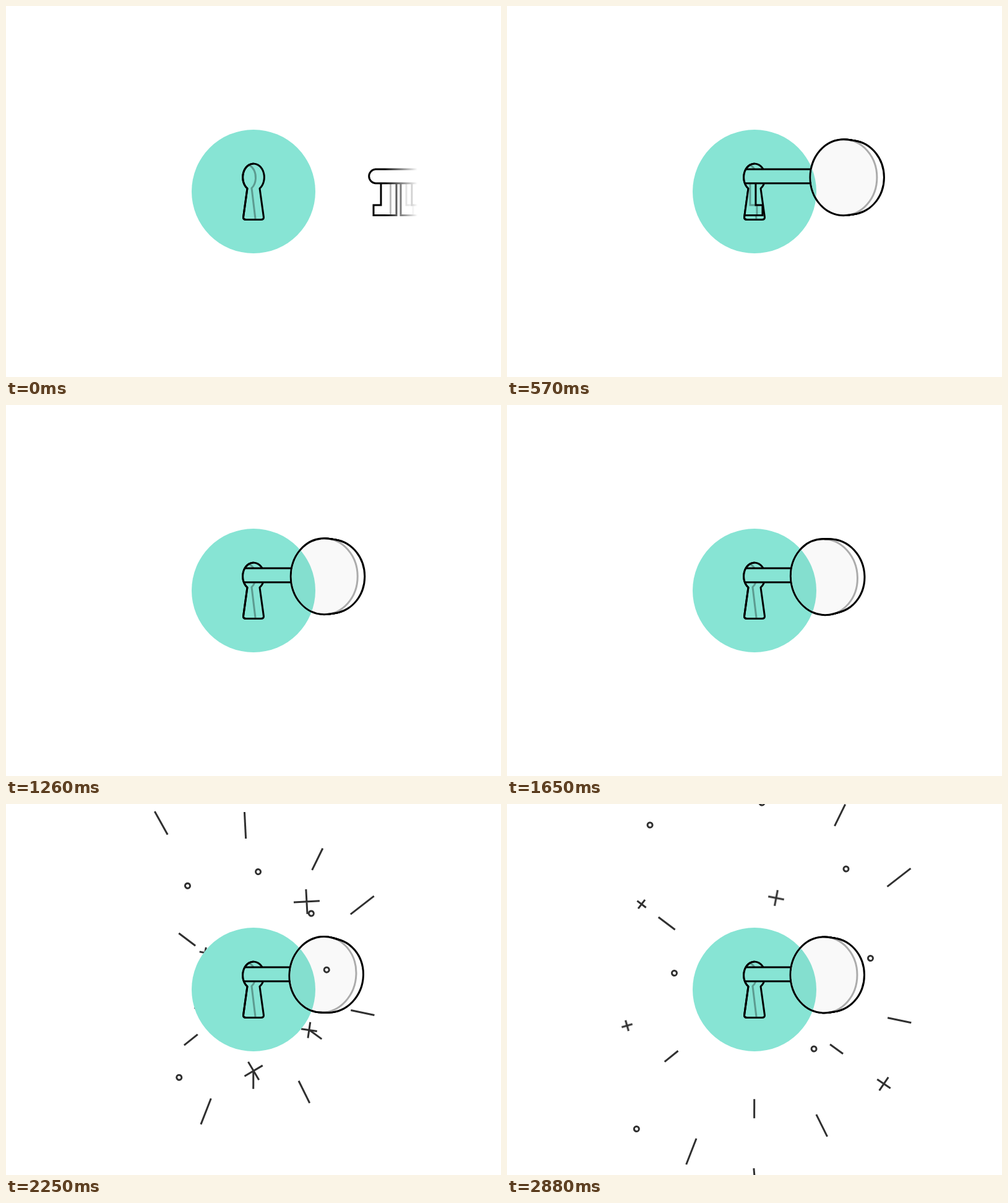
Write an HTML page without scripts that moves like this. It is 800 px wide and 600 px high and loops after 2.91 s.

```html
<!DOCTYPE html>
<html lang="en">
<head>
<meta charset="utf-8">
<title>Key and keyhole</title>
<style>
@property --t { syntax: "<number>"; inherits: true; initial-value: 0; }

html, body { margin: 0; width: 100%; height: 100%; overflow: hidden; background: #fff; }

/* --t is the clock in ms; every pose below is a formula of it */
svg {
  display: block; width: 800px; height: 600px;
  animation: clock 2910ms steps(97) -2ms infinite;

  /* slide of the key */
  --slide: calc(286 * exp(var(--t) / -260));

  /* half turn of the key: speeds up to edge-on, then slows down */
  --p: clamp(0, (var(--t) - 1578) / 751, 1);
  --m: min(var(--p), 1 - var(--p));
  --half: clamp(-1, (var(--p) - .5) * 9999, 1);
  --a: calc(6.28319 * var(--m) * var(--m) * var(--half));
  --sin: sin(var(--a));
  --cos: max(.05, cos(var(--a)));
  --lift: max(var(--sin), -1 * var(--sin));
  --cy: calc(276.8 - .4 * var(--half));
}
@keyframes clock { from { --t: 0; } to { --t: 2910; } }

.teal { fill: #87e4d4; }
.white { fill: #fff; }
.line { fill: none; stroke: #000; stroke-width: 3; stroke-linejoin: round; }
.soft { fill: none; stroke: #000; stroke-width: 3; stroke-opacity: .32; }

.key { transform: translateX(calc(var(--slide) * 1px)); }

/* slice of the coin, --f runs from near (0) to far (1) */
.disc {
  rx: 52.5px; ry: 60px;
  vector-effect: non-scaling-stroke;
  transform: matrix(1, 0,
    calc(-.488 * var(--sin)),
    calc(var(--cos) * (1 - .03 * var(--f))),
    calc(var(--slide) + 517.75 - 1.6 * var(--lift) + 11.5 * var(--cos) * (var(--f) - .5)),
    calc(var(--cy) + 4.4 * var(--lift) + 27 * var(--sin) * (var(--f) - .5)));
}
.rim { fill: #000; stroke: #000; stroke-width: 6; }
.face { rx: 54px; ry: 61.5px; fill: #000; fill-opacity: .022; }

/* burst */
.burst { fill: none; stroke: #303030; stroke-width: 3; }
.rays { --g: max(0, 1 - exp((1926 - var(--t)) / 260)); }
.dots { --g: max(0, 1 - exp((2006 - var(--t)) / 260)); }
.plus { --g: max(0, 1 - exp((2114 - var(--t)) / 260)); }
.rays path { transform: rotate(calc(var(--d) * 1deg)) translateX(calc(var(--r) * var(--g) * 1px)); }
.dots circle { r: 4px; }
.dots circle, .plus path {
  transform:
    translate(calc(var(--x) * var(--g) * 1px), calc(var(--y) * var(--g) * 1px))
    rotate(calc((var(--d, 0) - 48 * (1 - var(--g))) * 1deg));
}
</style>
</head>
<body>
<svg viewBox="0 0 800 600" xmlns="http://www.w3.org/2000/svg">
  <defs>
    <path id="hole" d="M400 255A17.3 22 0 0 0 390 295L383.6 341Q383 345.5 388 345.5H412Q417 345.5 416.4 341L410 295A17.3 22 0 0 0 400 255Z"/>
    <g id="ground">
      <rect class="white" width="800" height="600"/>
      <circle class="teal" cx="400" cy="300" r="100"/>
    </g>
    <clipPath id="reach">
      <use href="#hole"/>
      <rect x="400" width="400" height="600"/>
    </clipPath>
    <clipPath id="solid">
      <path class="key" d="M490 264H311A11.4 11.4 0 0 0 311 286.7H490Z"/>
      <path class="key" d="M320 286V322H308V338.5H345V286Z"/>
      <path class="key" d="M352 286V338.5H381V322H370V286Z"/>
    </clipPath>
    <clipPath id="coin">
      <ellipse class="disc" style="--f:0"/>
      <ellipse class="disc" style="--f:.11"/>
      <ellipse class="disc" style="--f:.22"/>
      <ellipse class="disc" style="--f:.33"/>
      <ellipse class="disc" style="--f:.44"/>
      <ellipse class="disc" style="--f:.56"/>
      <ellipse class="disc" style="--f:.67"/>
      <ellipse class="disc" style="--f:.78"/>
      <ellipse class="disc" style="--f:.89"/>
      <ellipse class="disc" style="--f:1"/>
    </clipPath>
    <linearGradient id="dim" gradientUnits="userSpaceOnUse" x1="612" x2="665" y1="0" y2="0">
      <stop stop-color="#fff"/>
      <stop offset="1" stop-color="#fff" stop-opacity="0"/>
    </linearGradient>
    <mask id="fade" maskUnits="userSpaceOnUse" x="0" y="0" width="800" height="600">
      <rect width="800" height="600" fill="url(#dim)"/>
    </mask>
    <mask id="behind" maskUnits="userSpaceOnUse" x="0" y="0" width="800" height="600">
      <rect class="white" width="800" height="600"/>
      <circle cx="400" cy="300" r="100"/>
    </mask>
  </defs>

  <use href="#ground"/>
  <path class="soft" d="M393 257Q404 264 403.5 279Q403 289 397 294.5L403 344"/>
  <use href="#hole" class="line"/>

  <g mask="url(#fade)">
    <g clip-path="url(#reach)">
      <g clip-path="url(#solid)"><use href="#ground"/></g>
      <g class="key">
        <path class="soft" d="M335.5 287V338M361 287V322H372V338"/>
        <path class="line" style="stroke-linejoin:miter" d="M320 287V322H308V338.5H345V287M352 287V338.5H381V322H370V287"/>
        <path class="line" d="M490 264H311A11.4 11.4 0 0 0 311 286.7H490"/>
      </g>
    </g>
    <g class="rim">
      <ellipse class="disc" style="--f:0"/>
      <ellipse class="disc" style="--f:.11"/>
      <ellipse class="disc" style="--f:.22"/>
      <ellipse class="disc" style="--f:.33"/>
      <ellipse class="disc" style="--f:.44"/>
      <ellipse class="disc" style="--f:.56"/>
      <ellipse class="disc" style="--f:.67"/>
      <ellipse class="disc" style="--f:.78"/>
      <ellipse class="disc" style="--f:.89"/>
      <ellipse class="disc" style="--f:1"/>
    </g>
    <g clip-path="url(#coin)">
      <use href="#ground"/>
      <ellipse class="disc soft face" style="--f:0"/>
    </g>
  </g>
  <path class="line" d="M400 255A17.3 22 0 0 0 390 295L383.6 341Q383 345.5 388 345.5H400"/>

  <g class="burst" mask="url(#behind)">
    <g transform="translate(400 300)">
      <g class="rays">
        <path d="M0 0H39" style="--d:-63.9;--r:302"/>
        <path d="M0 0H48" style="--d:-37.8;--r:278.6"/>
        <path d="M0 0H39" style="--d:12;--r:225.7"/>
        <path d="M0 0H26" style="--d:36;--r:154.8"/>
        <path d="M0 0H40" style="--d:63.7;--r:231.3"/>
        <path d="M0 0H31" style="--d:90.1;--r:182"/>
        <path d="M0 0H45" style="--d:111.3;--r:265.5"/>
        <path d="M0 0H28" style="--d:141.2;--r:162.6"/>
        <path d="M0 0H33.6" style="--d:217;--r:165"/>
        <path d="M0 0H43" style="--d:241;--r:402"/>
        <path d="M0 0H43" style="--d:267.1;--r:343"/>
      </g>
      <g class="dots">
        <circle style="--x:-175;--y:-275.5"/>
        <circle style="--x:12.4;--y:-312.8"/>
        <circle style="--x:153.3;--y:-202"/>
        <circle style="--x:-134.2;--y:-27.5"/>
        <circle style="--x:194.2;--y:-52.3"/>
        <circle style="--x:99.5;--y:99.5"/>
        <circle style="--x:-197.5;--y:233.6"/>
      </g>
      <g class="plus">
        <path d="M-21 0H21M0-20V20" style="--x:211;--y:-349;--d:25.3"/>
        <path d="M-13 0H13M0-13V13" style="--x:36.9;--y:-156.2;--d:13.5"/>
        <path d="M-9 0H9M0-9V9" style="--x:-192.6;--y:-145.6;--d:40"/>
        <path d="M-9 0H9M0-9V9" style="--x:-217.4;--y:61.7;--d:-13.5"/>
        <path d="M-13 0H13M0-13V13" style="--x:220.6;--y:161;--d:36.8"/>
        <path d="M-17 0H17M0-17V17" style="--x:.3;--y:323;--d:-2.2"/>
      </g>
    </g>
  </g>
</svg>
</body>
</html>
```
